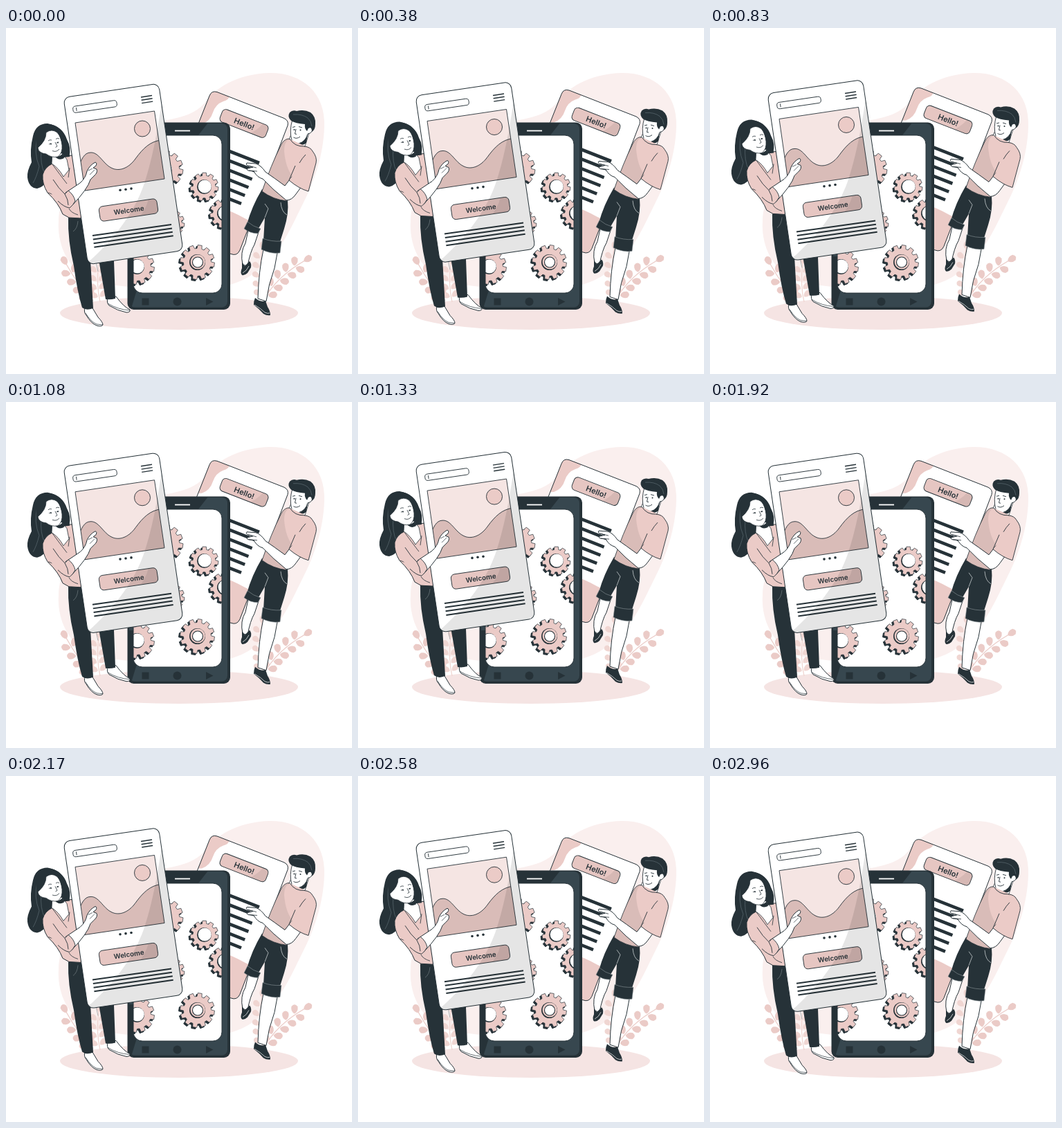
An HTML page with a canvas that plays this animation: 500x500 px, repeating every 3 s.

```html
<!DOCTYPE html>
<html lang="en">
<head>
<meta charset="utf-8">
<title>Building an app</title>
<style>
html, body { margin: 0; width: 100%; height: 100%; overflow: hidden; background: #fff; }
canvas { display: block; width: 500px; height: 500px; }
</style>
</head>
<body>
<canvas id="stage"></canvas>
<script>
const INK = '#263238', SLATE = '#37474f', PINK = '#ebcbc7', ROSE = '#d9bcb8', PALE = '#f5e5e3', WHITE = '#fff';
const LOOP = 3000, STEPS = 72, LIFT = 10;
const LEFT = -8.4 * Math.PI / 180, RIGHT = 21.3 * Math.PI / 180;

const canvas = document.getElementById('stage');
const c = canvas.getContext('2d');
const dpr = window.devicePixelRatio || 1;
canvas.width = canvas.height = 500 * dpr;

function paint(p, fill, line, w = 1) {
  if (fill) { c.fillStyle = fill; c.fill(p); }
  if (line) { c.strokeStyle = line; c.lineWidth = w; c.stroke(p); }
}
const shape = (d, fill, line, w) => paint(new Path2D(d), fill, line, w);
const ink = (d, w = 1) => shape(d, null, INK, w);

function disc(x, y, r, fill, line, w) {
  const p = new Path2D();
  p.arc(x, y, r, 0, 7);
  paint(p, fill, line, w);
}
function box(x, y, w, h, r, fill, line, lw) {
  const p = new Path2D();
  p.roundRect(x, y, w, h, r);
  paint(p, fill, line, lw);
}
// Runs fn with the origin moved to (x, y) and turned by a
function at(x, y, a, fn) {
  c.save();
  c.translate(x, y);
  c.rotate(a);
  fn();
  c.restore();
}
function clipped(p, fn) {
  c.save();
  c.clip(p);
  fn();
  c.restore();
}
function button(x, y, a, w, h, text, size) {
  at(x, y, a, () => {
    const p = new Path2D();
    p.roundRect(-w / 2, -h / 2, w, h, 5.5);
    paint(p, '#e6c6c2');
    clipped(p, () => shape(`M${w * .36} ${-h / 2}H${w}V${h}H${w * .05}Q${w * .3} ${h * .2} ${w * .36} ${-h / 2}Z`, 'rgba(0,0,0,.07)'));
    paint(p, null, INK, .9);
    c.fillStyle = INK;
    c.font = `600 ${size}px Inter, "Open Sans", sans-serif`;
    c.textAlign = 'center';
    c.fillText(text, .5, size * .4);
  });
}

function leaf(x, y, a, len, color) {
  at(x, y, a, () => shape(
    `M0 0 Q${len * .25} ${-len * .42} ${len * .75} ${-len * .32} Q${len * 1.15} 0 ${len * .75} ${len * .32} Q${len * .25} ${len * .42} 0 0`, color));
}
function plant(x0, y0, cx, cy, x1, y1, n, len, color) {
  shape(`M${x0} ${y0} Q${cx} ${cy} ${x1} ${y1}`, null, color, 1.3);
  for (let i = 0; i <= n; i++) {
    const u = .12 + .86 * i / n, v = 1 - u;
    const x = v * v * x0 + 2 * u * v * cx + u * u * x1;
    const y = v * v * y0 + 2 * u * v * cy + u * u * y1;
    const a = Math.atan2(v * (cy - y0) + u * (y1 - cy), v * (cx - x0) + u * (x1 - cx));
    if (i === n) leaf(x, y, a, len, color);
    else for (const s of [-1, 1]) {
      const b = a + s * .95;
      leaf(x + Math.cos(b) * 2, y + Math.sin(b) * 2, b, len, color);
    }
  }
}

function gearPath(r, teeth) {
  const p = new Path2D(), step = Math.PI * 2 / teeth;
  for (let i = 0; i < teeth; i++) {
    for (const [k, q] of [[-.34, .8], [-.23, 1], [.23, 1], [.34, .8]]) {
      const a = (i + k) * step + .15;
      p.lineTo(Math.cos(a) * r * q, Math.sin(a) * r * q);
    }
  }
  p.closePath();
  return p;
}
function gear(x, y, r, hole, teeth, ring) {
  const p = gearPath(r, teeth);
  at(x - 2, y + 2, 0, () => paint(p, INK, INK, 1));
  at(x, y, 0, () => paint(p, PINK, INK, .7));
  disc(x, y, hole, INK);
  disc(x + .7, y - .5, hole - .9, ring ? PINK : WHITE);
  if (ring) disc(x + .5, y, hole - 4, WHITE, INK, 1.1);
}

function backdrop() {
  c.fillStyle = WHITE;
  c.fillRect(0, 0, 500, 500);
  shape('M380 65C428 64 462 94 460 142C459 182 446 222 428 256C412 288 394 334 350 360C300 390 200 377 145 370C98 364 73 322 76 278C79 220 132 152 195 140C240 131 270 130 288 107C308 80 344 66 380 65Z', '#faefee');
  const floor = new Path2D();
  floor.ellipse(250, 412, 172, 24, 0, 0, 7);
  paint(floor, '#f5e4e3');
  plant(372, 394, 364, 360, 370, 318, 5, 12, '#f0d6d2');
  plant(372, 394, 390, 360, 432, 336, 5, 14, PINK);
  plant(136, 396, 130, 370, 134, 340, 4, 12, '#f0d6d2');
  plant(126, 394, 104, 372, 87, 341, 4, 14, PINK);
}

function phone() {
  box(175.5, 136.5, 148.5, 270.5, 9, INK);
  box(178, 138, 142, 265.5, 8, SLATE);
  shape('M180 137H292L274 160H180Z', INK);
  shape('M176 330H204L181 405Q176 403 176 397Z', INK);
  const screen = new Path2D();
  screen.roundRect(184, 155, 128, 228, 13);
  paint(screen, WHITE);
  clipped(screen, () => {
    gear(286.5, 229.5, 20.5, 10.5, 11);
    gear(316, 268, 21.5, 11, 11);
    gear(276.5, 338.5, 25, 11.5, 12, true);
    gear(189, 345, 25.5, 11, 12);
    gear(229, 204, 27, 11, 12);
    gear(239, 282, 19, 9, 11);
  });
  paint(screen, null, INK, 1);
  shape('M244 148.5H266', null, WHITE, 1.8);
  shape('M196.5 390.5H206.5V400.5H196.5ZM289 390L299.5 395.5L289 401Z', INK);
  disc(247.5, 395.5, 6, INK);
}

function rightCard() {
  const card = new Path2D('M305 92.5L402 130.5Q409 134 407 141L338 321Q334 330 325 326.5L227 288Q220 284 223 277L294 98Q297 90 305 92.5Z');
  paint(card, WHITE);
  clipped(card, () => {
    shape('M280 70L323 98Q322 104 314 106Q303 110 299 122Q295 135 283 139H250Z', PINK);
    shape('M300 260C324 261 336 271 357 281L345 340H300Z', PINK);
    for (let i = 0; i < 6; i++) {
      const y = 179 + i * 13.8, x = 366 - i * 5.2;
      ink(`M310 ${y - 6}L${x} ${y + (x - 325) * .39}`, 4.6);
    }
  });
  paint(card, null, INK);
  button(344, 138, RIGHT, 71, 19.5, 'Hello!', 11);
}

function man() {
  // rear leg
  shape('M351 288L346 311Q338 324 342 342L349 344Q353 323 359 313L366 292Z', WHITE, INK);
  shape('M341 338L345 344L352 337Q355 340 354 346L349 354Q345 358 341 357Q338 354 341 347Z', INK);
  shape('M342 354Q348 351 351 344', null, WHITE, .7);
  // front leg
  shape('M372 320Q365 352 364 391L376 395Q379 371 388 347L393 320Z', WHITE, INK);
  shape('M360 390Q358 394 358 400Q366 406 372 413Q377 416 382 415Q382 409 378 403L375 394Q368 397 360 390Z', INK);
  shape('M359 400Q368 405 374 411Q378 413 381 412', null, WHITE, .7);
  // shorts with turned-up cuffs
  shape('M370 233L407 249Q409 268 402 290L396 309L372 308L374 274L363 293L348 284Q355 258 370 233Z', INK);
  shape('M349 280L344 290Q353 297 364 297L368 290Q357 287 349 280ZM371 304L369 320Q383 327 396 325L398 308Q383 309 371 304Z', INK, '#8b9599', .6);
  shape('M397 252Q398 266 406 270M374 274L379 261L374 254', null, '#c7cdcf', .8);
  // torso
  shape('M408 160Q401 161 397 170Q383 198 370 236Q386 248 406 250Q414 236 420 222L440 180L431 169Z', ROSE, INK, .8);
  // neck and head
  shape('M412 154L409 161Q418 175 431 174L438 152Z', WHITE, INK, .8);
  shape('M419 167Q430 166 436 153L434 166Q428 172 419 167Z', INK);
  shape('M414 132Q409 149 413 162Q416 168 423 167Q433 164 436 153Q443 152 443 145Q441 140 436 144L434 132Z', WHITE, INK, .9);
  shape('M412 134Q406 128 410 122Q414 118 420 120Q431 117 440 122Q448 128 447 139Q447 147 442 150Q442 142 437 145L435 149Q431 145 432 139Q418 138 412 134Z', INK);
  shape('M415 125Q428 124 436 130Q441 134 442 142', null, '#66757b', .6);
  disc(416.5, 147, 1, INK);
  disc(425.5, 147.5, 1, INK);
  ink('M414 143.5L418 142.5M423 142.5L428 144M419 146L417.5 153L420 153.5M415.5 158Q420 161 425 157', .9);
  // arm and sleeve
  shape('M413 215L403 228Q388 217 375 208Q368 198 361 196L348 195Q346 197 349 199L357 201L349 203Q347 205 350 206L358 207Q363 216 371 218Q386 234 405 249Q413 249 419 240L430 225Z', WHITE, INK);
  ink('M350 199L362 202M351 206L363 207', .8);
  shape('M411 161Q402 162 402 178Q404 202 414 214L409 220Q423 232 437 236L448 195Q450 187 443 178Q440 172 431 170Z', PINK);
  ink('M431 171Q440 172 443 178Q450 187 448 195L437 236Q423 232 409 220L418 199M433 183Q428 188 424 195M410 160Q417 172 432 171', .9);
}

function woman() {
  // shoes and trousers
  shape('M114 403Q112 411 116 415Q123 427 131 430Q138 432 140 429Q140 425 133 418L124 403Z', WHITE, INK);
  ink('M115 412Q123 425 131 428L140 429', .7);
  shape('M147 389Q145 397 149 401Q162 409 174 411Q180 411 179 407Q170 403 159 388Z', WHITE, INK);
  ink('M147 398Q162 407 179 408', .7);
  shape('M107 274L155 310L158 391Q151 393 144 392L134 335L122 335L126 405Q116 409 110 404Q103 381 98 344Q89 306 90 274Z', INK);
  shape('M128 329L133 352M104 279Q103 290 97 294', null, '#7c888c', .6);
  // hair behind the face
  shape('M60 138Q43 138 39 156Q34 176 37 194Q30 207 31 216Q33 231 45 232Q55 230 60 218Q64 206 70 199L91 186Q95 173 88 161Q82 142 60 138Z', INK);
  shape('M45 158Q40 181 48 200Q44 216 39 224M51 176Q49 196 56 211', null, '#66757b', .6);
  // shirt
  shape('M67 196Q56 201 53 212Q52 225 60 238Q76 253 82 269L91 274L108 275L118 250L96 184Q87 184 82 187Z', PINK, INK);
  // neck and face
  shape('M67 180L66 196Q76 202 83 215L91 205L88 190L81 181Z', WHITE, INK, .8);
  shape('M69 184Q77 188 82 181L84 188Q76 193 69 184Z', INK);
  shape('M58 151Q58 163 46 173Q47 181 58 182Q66 188 75 186Q82 181 81 169Q80 158 74 151Q66 145 58 151Z', WHITE, INK, .8);
  shape('M74 148Q57 143 55 155Q53 168 44 174L43 155Q51 139 62 139Q77 140 86 157Q92 171 92 186L83 187Q82 163 74 148Z', INK);
  disc(65, 167.5, 1, INK);
  disc(75, 165.5, 1, INK);
  ink('M61 163Q63 161 66 162M72 160.5Q74 158.5 77 160M71 165L74 171L71.5 172.5M67 177.5Q73 180 77 175M62 168L65 167M73 166L76 165', .8);
  ink('M67 197Q78 212 88 225M92 202L90 216M61 238Q74 242 80 251M91 261Q94 267 104 270', .8);
}

function leftCard() {
  at(169.5, 211, LEFT, () => box(-69.5, -122, 139, 244, 9, WHITE));
  at(128.5, 113.5, LEFT, () => {
    box(-32, -4.7, 64, 9.4, 4, WHITE, INK, .9);
    ink('M-27 -2.5V2.5', .9);
  });
  for (let i = 0; i < 3; i++) ink(`M${195 + i * .6} ${100 + i * 4.3}l16 -2.5`, 1.4);

  const frame = new Path2D('M100 137L214.5 120L229 218L114 235Z');
  paint(frame, PALE);
  disc(197, 145.5, 11.5, PINK, INK, .9);
  clipped(frame, () => shape('M104 202C109 190 113 180 122 180C134 179 140 196 152 202C163 208 177 203 187 189C198 174 208 164 224 162L240 240H100Z', ROSE, INK, .9));
  paint(frame, null, INK, .9);

  for (let i = 0; i < 3; i++) disc(165 + i * 8, 234.3 - i * 1.1, 1.8, INK);
  button(177, 263, LEFT, 84.5, 21.5, 'Welcome', 9.8);
  for (let i = 0; i < 4; i++) ink(`M${125 + i * .8} ${300 + i * 5.6}L${239 + i * .9} ${284 + i * 5.4}`, 2);

  at(169.5, 211, LEFT, () => {
    const edge = new Path2D();
    edge.roundRect(-69.5, -122, 139, 244, 9);
    clipped(edge, () => {
      c.rotate(-LEFT);
      c.translate(-169.5, -211);
      shape('M226 100Q215 180 199 227C186 264 160 302 116 341L130 360H280V100Z', 'rgba(0,0,0,.1)');
    });
    paint(edge, null, INK);
  });
}

function womanArm() {
  shape('M86 238L107 224Q115 217 117 207Q121 198 129 194Q132 195 130 199L126 202L131 204Q133 209 127 214L122 219Q118 233 95 257Z', WHITE, INK);
  ink('M119 206L125 203M128 205L121 212', .7);
  shape('M68 219Q76 232 85 240L90 235Q98 241 100 250Q97 256 92 260Q84 259 75 250Q63 239 58 225Z', PINK);
  ink('M68 219Q76 232 85 240L90 235Q98 241 100 250Q97 256 92 260Q84 259 75 250M85 240Q90 248 90 256', .9);
}

function draw(ms) {
  const step = Math.floor(ms % LOOP / LOOP * STEPS + .15);
  const y = -LIFT * (1 - Math.abs(1 - 2 * step / STEPS));
  c.setTransform(dpr, 0, 0, dpr, 0, 0);
  c.lineJoin = 'round';
  const floating = (...parts) => at(0, y, 0, () => parts.forEach(part => part()));
  backdrop();
  floating(rightCard);
  phone();
  floating(man, woman, leftCard, womanArm);
}

const start = performance.now();
function tick() {
  draw(performance.now() - start);
  requestAnimationFrame(tick);
}
tick();
</script>
</body>
</html>
```
